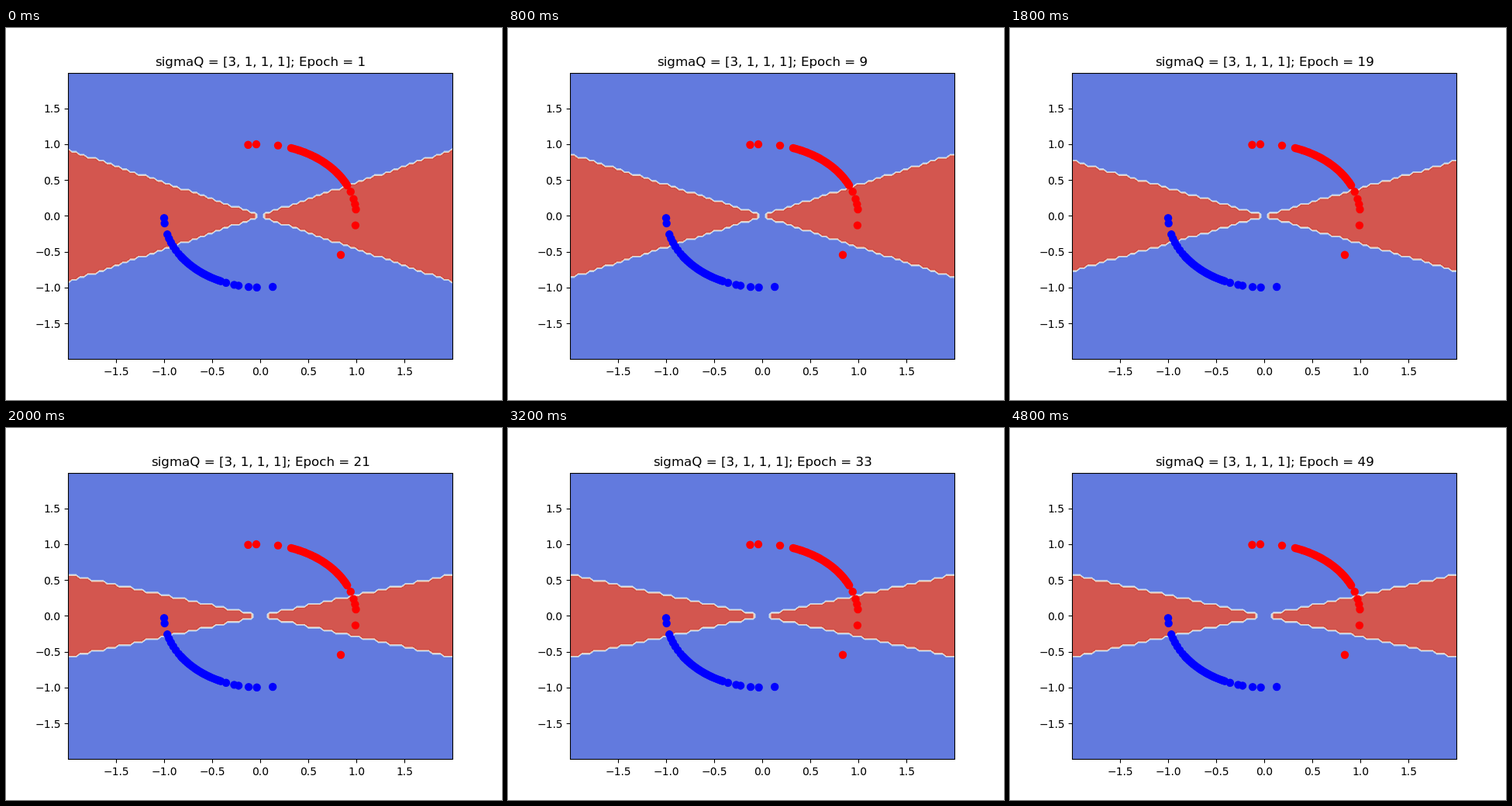
An HTML page with a canvas that plays this animation: 640 by 480 pixels, repeating every 5000 ms.

```html
<!DOCTYPE html>
<html lang="en">
<head>
<meta charset="utf-8">
<title>Decision boundary</title>
<style>
  html, body { margin: 0; width: 100%; height: 100%; overflow: hidden; background: #fff; }
  canvas { display: block; }
</style>
</head>
<body>
<canvas id="plot" width="640" height="480"></canvas>
<script>
const ctx = document.getElementById('plot').getContext('2d');
const L = 80, T = 57.6, W = 496, H = 369.6;   // axes box
const TOP = 58, ROWS = 370;                   // pixel rows inside it
const LIM = 1.9999;                           // data runs from -LIM to LIM
const N = 100;                                // grid points per side
const STEP = 200, LOOP = 5000;
const toX = x => L + (x / LIM + 1) / 2 * W;
const toY = y => T + (1 - y / LIM) / 2 * H;

// Seven contour colours: a quadratic through blue, grey and red
const cold = [80, 107, 218], grey = [221, 221, 221], warm = [206, 67, 59];
const bands = Array.from({ length: 7 }, (_, i) => {
  const s = i / 3 - 1;
  return grey.map((g, c) =>
    cold[c] * s * (s - 1) / 2 + g * (1 - s * s) + warm[c] * s * (s + 1) / 2);
});
const bandAt = z => Math.min(6, Math.floor(z / 0.15 + 1e-6));

// Start time and slope of the class boundary
const stages = [[0, 0.46], [400, 0.43], [1000, 0.382], [2000, 0.286]];

// Evenly spaced angles in degrees
const run = (from, to, n) =>
  Array.from({ length: n }, (_, i) => from + (to - from) * i / (n - 1));

// A dense arc and its outliers for each class
const redDots = [...run(71.2, 25.2, 36), ...run(13.6, 5.2, 3), 97.2, 92.3, 79.3, 19.7, -7.6, -33];
const blueDots = [...run(214.5, 245.8, 25), ...run(195, 212, 6),
  181.7, 186, 249.2, 254.3, 257, 263.1, 268, 277.5];

// Height of the contour surface at grid position (x, y)
function surface(grid, x, y) {
  const i = Math.min(N - 2, Math.max(0, Math.floor(x)));
  const j = Math.min(N - 2, Math.max(0, Math.floor(y)));
  const p = j * N + i;
  const a = grid[p], b = grid[p + 1], c = grid[p + N], d = grid[p + N + 1];
  const sum = a + b + c + d;
  if (sum === 0 || sum === 4) return sum / 4;
  const u = Math.min(1, Math.max(0, x - i)), v = Math.min(1, Math.max(0, y - j));
  if (sum === 2) return (a * (1 - u) + b * u) * (1 - v) + (c * (1 - u) + d * u) * v;
  // One corner differs: contours cut straight across it
  const odd = sum === 1 ? 1 : 0;
  const right = b === odd || d === odd, low = c === odd || d === odd;
  const dist = Math.min(1, (right ? 1 - u : u) + (low ? 1 - v : v));
  return odd ? 1 - dist : dist;
}

// Every band that touches a pixel paints it at 90%, lowest band first
function makeField(slope) {
  const grid = new Uint8Array(N * N);
  for (let j = 0; j < N; j++)
    for (let i = 0; i < N; i++)
      grid[j * N + i] = Math.abs(2 * j - 99) <= slope * Math.abs(2 * i - 99) ? 1 : 0;

  const img = ctx.createImageData(W, ROWS);
  for (let py = 0; py < ROWS; py++) {
    for (let px = 0; px < W; px++) {
      let min = 1, max = 0;
      for (let s = 0; s < 9; s++) {
        const x = (px + 0.02 + s % 3 * 0.48) / W * (N - 1);
        const y = (py + TOP - T + 0.02 + Math.floor(s / 3) * 0.48) / H * (N - 1);
        const z = surface(grid, x, y);
        min = Math.min(min, z);
        max = Math.max(max, z);
      }
      let color = [255, 255, 255];
      for (let b = bandAt(min); b <= bandAt(max); b++)
        color = color.map((v, c) => v * 0.1 + bands[b][c] * 0.9);
      img.data.set([...color, 255], (py * W + px) * 4);
    }
  }
  return img;
}

const fields = stages.map(([start, slope]) => ({ start, img: makeField(slope) }));

function dots(angles, color) {
  ctx.fillStyle = color;
  for (const deg of angles) {
    const a = deg * Math.PI / 180;
    ctx.beginPath();
    ctx.arc(toX(Math.cos(a)), toY(Math.sin(a)), 5.2, 0, 7);
    ctx.fill();
  }
}

// Text starts on a whole pixel, its first glyph set one pixel in;
// align is the share of the width left of x
function text(str, x, y, size, align) {
  ctx.font = size + 'px "DejaVu Sans", sans-serif';
  const left = Math.round(x - ctx.measureText(str).width * align);
  ctx.fillText(str[0], left + 1, y);
  ctx.fillText(str.slice(1), left + ctx.measureText(str[0]).width, y);
}

function line(x1, y1, x2, y2) {
  ctx.beginPath();
  ctx.moveTo(x1, y1);
  ctx.lineTo(x2, y2);
  ctx.stroke();
}

const snap = v => Math.floor(v + 0.5) + 0.5;

function axes() {
  ctx.fillStyle = ctx.strokeStyle = '#000';
  ctx.lineWidth = 1.11;
  ctx.strokeRect(80.5, 58.5, 496, 369);
  for (let v = -1.5; v <= 1.5; v += 0.5) {
    const label = v.toFixed(1).replace('-', '\u2212');
    const x = toX(v), y = toY(v);
    line(snap(x), 427.5, snap(x), 432.4);
    line(75.6, snap(y), 80.5, snap(y));
    text(label, x, 448, 13.89, 0.5);
    text(label, 70.2, Math.round(y + 5.5), 13.89, 1);
  }
}

function draw() {
  const t = performance.now() % LOOP;
  const epoch = 1 + 2 * Math.floor(t / STEP);
  ctx.fillStyle = '#fff';
  ctx.fillRect(0, 0, 640, 480);
  ctx.putImageData(fields.filter(f => f.start <= t).pop().img, L, TOP);
  dots(redDots, '#f00');
  dots(blueDots, '#00f');
  axes();
  text(`sigmaQ = [3, 1, 1, 1]; Epoch = ${epoch}`, 328, 49, 16.67, 0.5);
  requestAnimationFrame(draw);
}
draw();
</script>
</body>
</html>
```
